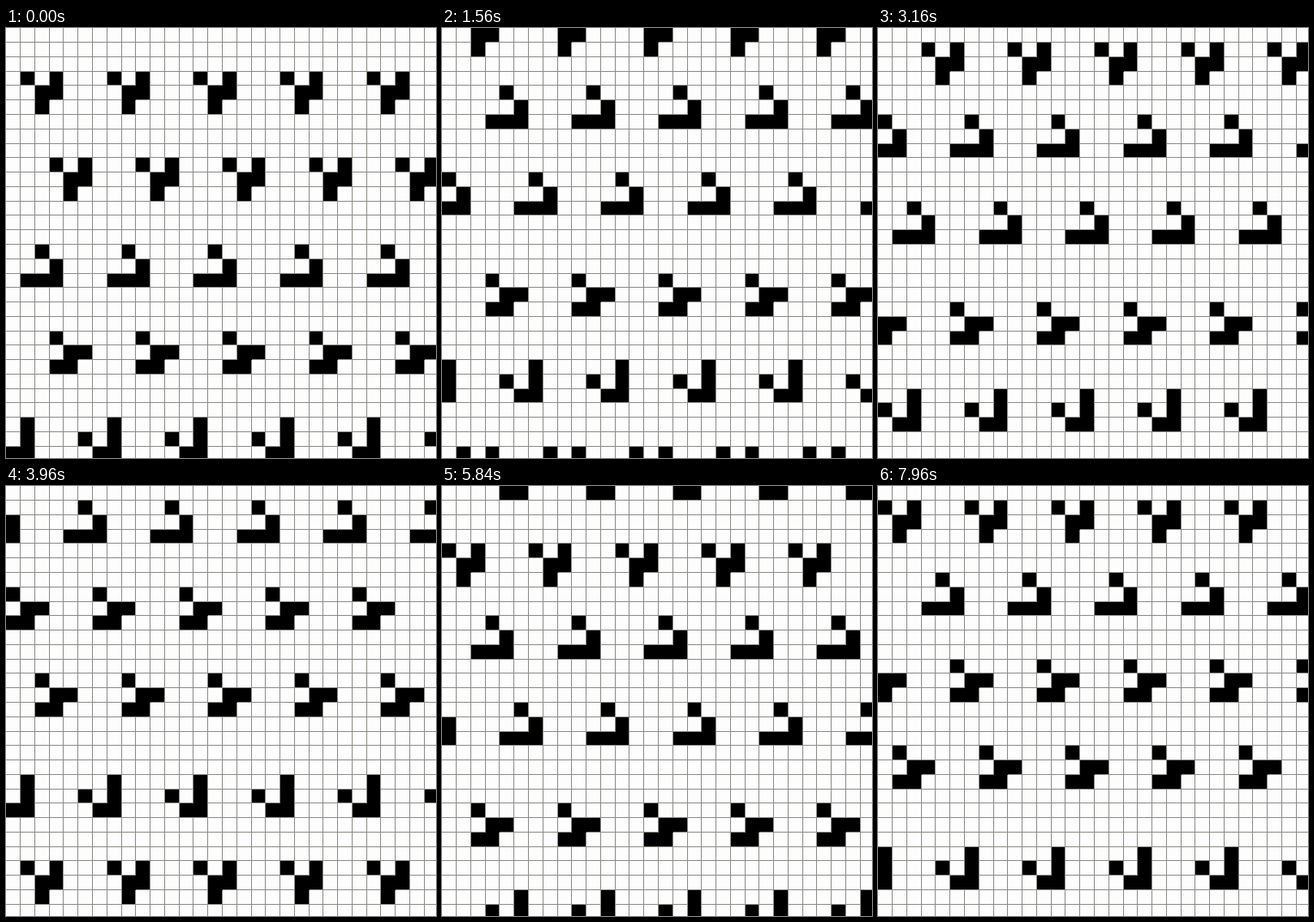
An HTML page with a canvas for the animation above (8 s loop, 500 by 500 pixels).

```html
<!DOCTYPE html>
<html lang="en">
<head>
<meta charset="utf-8">
<title>Gliders</title>
<style>
  html, body { margin: 0; width: 100%; height: 100%; overflow: hidden; background: #fdfdfd; }
  canvas { display: block; width: 500px; height: 500px; }
</style>
</head>
<body>
<canvas id="stage" width="500" height="500"></canvas>
<script>
const ctx = document.getElementById('stage').getContext('2d');
const SIZE = 500, CELL = 16.771, OFFSET = -0.09, CELLS = 30, SPACING = 6;
const LOOP = 8000, GENERATION = 209.2, LEAD = 0.03;

// The four phases of a Game of Life glider, relative to its base cell.
const PHASES = [
  ['X.X', '.XX', '.X.'],
  ['..X', 'X.X', '.XX'],
  ['.X..', '..XX', '.XX.'],
  ['..X.', '...X', '.XXX'],
];

// Each row of gliders: base column, base row, age in generations.
const ROWS = [[1, 3, 0], [3, 9, 0], [0, 15, 3], [2, 21, 2], [5, 27, 1]];

const linePos = k => Math.floor(k * CELL + OFFSET);

function drawGrid() {
  ctx.fillStyle = '#fdfdfd';
  ctx.fillRect(0, 0, SIZE, SIZE);
  ctx.fillStyle = '#8c8c88';
  for (let k = 1; k < CELLS; k++) {
    ctx.fillRect(linePos(k), 0, 1, SIZE);
    ctx.fillRect(0, linePos(k), SIZE, 1);
  }
}

// Fills between the grid lines; a joined side also covers its line.
function fillCell(col, row, joinRight, joinDown) {
  const x = linePos(col) + 1, y = linePos(row) + 1;
  ctx.fillRect(x, y, linePos(col + 1) - x + joinRight, linePos(row + 1) - y + joinDown);
}

function drawGliders(generation) {
  ctx.fillStyle = '#000';
  for (const [col, row, startAge] of ROWS) {
    const age = startAge + generation;
    const shift = Math.floor(age / 4);
    const shape = PHASES[age % 4];
    const alive = (dx, dy) => shape[dy]?.[dx] === 'X';
    for (let dy = 0; dy < 3; dy++) {
      for (let dx = 0; dx < 4; dx++) {
        if (!alive(dx, dy)) continue;
        const y = (row + shift + dy) % CELLS;
        for (let x = (col + shift + dx) % SPACING; x < CELLS; x += SPACING) {
          fillCell(x, y, alive(dx + 1, dy) ? 1 : 0, alive(dx, dy + 1) ? 1 : 0);
        }
      }
    }
  }
}

function render(now) {
  drawGrid();
  drawGliders(Math.floor((now % LOOP) / GENERATION + LEAD));
}

const start = performance.now();
function tick() {
  render(performance.now() - start);
  requestAnimationFrame(tick);
}
tick();
</script>
</body>
</html>
```
